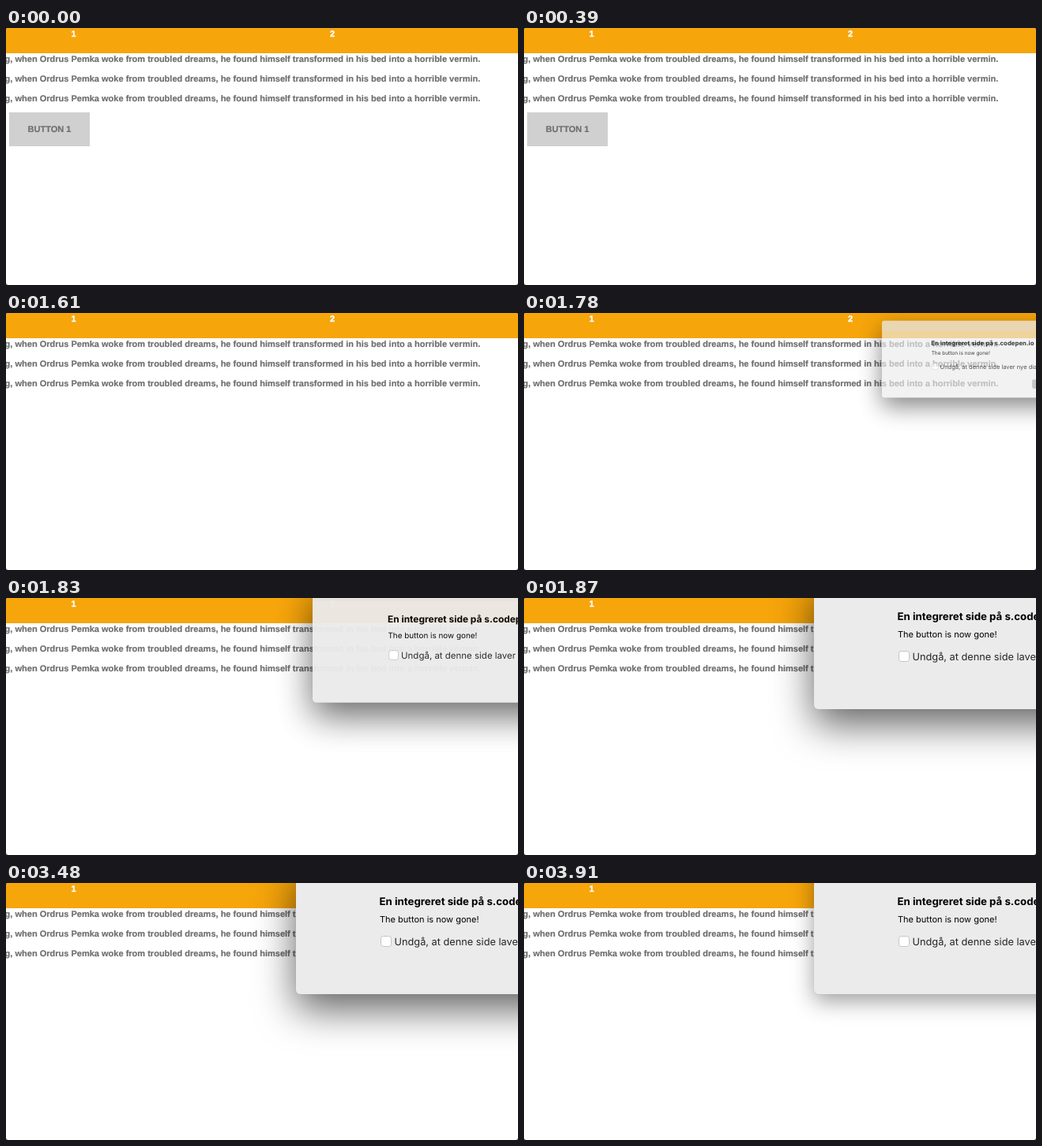
Animation of 648 by 326 pixels, one loop 4080 ms. Source, as an HTML page:

```html
<!DOCTYPE html>
<html lang="en">
<head>
<meta charset="utf-8">
<title>Button and alert</title>
<style>
  html, body { margin: 0; width: 100%; height: 100%; overflow: hidden; background: #3a3a3a; }
  body { position: relative; }
  svg { position: absolute; left: 0; top: 0; text-rendering: geometricPrecision; }

  .page { border-radius: 3px; background: #fff; }
  .page text {
    font: bold 11.03px "Liberation Sans", Arial, sans-serif;
    fill: #6f6f6f; stroke: #6f6f6f; stroke-width: .2px;
  }
  .page .tab { fill: #fff; stroke: #fff; stroke-width: .4px; text-anchor: middle; }

  .dialog {
    position: absolute; left: 367px; top: -24px; width: 420px; height: 165px;
    border-radius: 5px; background: #ebebeb;
    animation: zoom 4080ms step-end infinite, shadow 4080ms step-end infinite;
  }
  .dialog text { font: 12.75px Inter, sans-serif; fill: #262626; }
  .dialog .title { font-size: 13.25px; font-weight: 700; fill: #000; }
  .dialog .message { font-size: 11px; fill: #000; }

  .button { animation: fade 4080ms step-end infinite; }

  /* Cosine ease-out sampled at the screen's refresh */
  @keyframes fade {
    0% { opacity: 1; }
    29.9% { opacity: .81; }
    30.88% { opacity: .67; }
    31.86% { opacity: .52; }
    32.84% { opacity: .36; }
    34.06% { opacity: .19; }
    35.04% { opacity: .08; }
    36.02% { opacity: .02; }
    37%, 100% { opacity: 0; }
  }
  /* The body is more see-through than its title bar until fully open */
  @keyframes zoom {
    0% { opacity: 0; transform: scale(.3); background: #ebebebcc; }
    42.64% { opacity: .35; transform: scale(.35); background: #ebebebcc; }
    43.62% { opacity: .77; transform: scale(.59); background: #ebebebd8; }
    44.85% { opacity: .96; transform: scale(.9); background: #ebebeb; }
    45.83%, 100% { opacity: 1; transform: none; background: #ebebeb; }
  }
  @keyframes shadow {
    0% { box-shadow: 0 0 1px rgba(0, 0, 0, .25), 0 19px 50px rgba(0, 0, 0, .62); }
    95.83%, 100% { box-shadow: 0 0 1px rgba(0, 0, 0, .3), 0 9px 28px rgba(0, 0, 0, .38); }
  }
</style>
</head>
<body>
<svg class="page" width="648" height="326">
  <defs>
    <text id="line" x="600.3" text-anchor="end">One morning, when Ordrus Pemka woke from troubled dreams, he found himself transformed in his bed into a horrible vermin.</text>
  </defs>
  <rect width="648" height="32" fill="#f6a50b"/>
  <text class="tab" x="85.5" y="10.5">1</text>
  <text class="tab" x="413" y="10.5">2</text>
  <use href="#line" y="42.6"/>
  <use href="#line" y="67.6"/>
  <use href="#line" y="92.6"/>
  <g class="button">
    <rect x="4" y="107" width="102" height="43" fill="#d0d0d0"/>
    <text x="27.5" y="132">BUTTON 1</text>
  </g>
</svg>

<div class="dialog">
  <svg width="420" height="165">
    <path d="M0 22V5Q0 0 5 0H415Q420 0 420 5V22Z" fill="#e6e6e6"/>
    <text class="title" x="105.5" y="52">En integreret side på s.codepen.io</text>
    <text class="message" x="106" y="74">The button is now gone!</text>
    <rect x="107.5" y="91.5" width="13" height="13" rx="3" fill="#fff" stroke="#c4c4c4"/>
    <text x="124.5" y="103">Undgå, at denne side laver nye dialogbokse.</text>
    <rect x="322" y="126" width="82" height="20" rx="4" fill="#b4b4b4"/>
  </svg>
</div>
</body>
</html>
```
